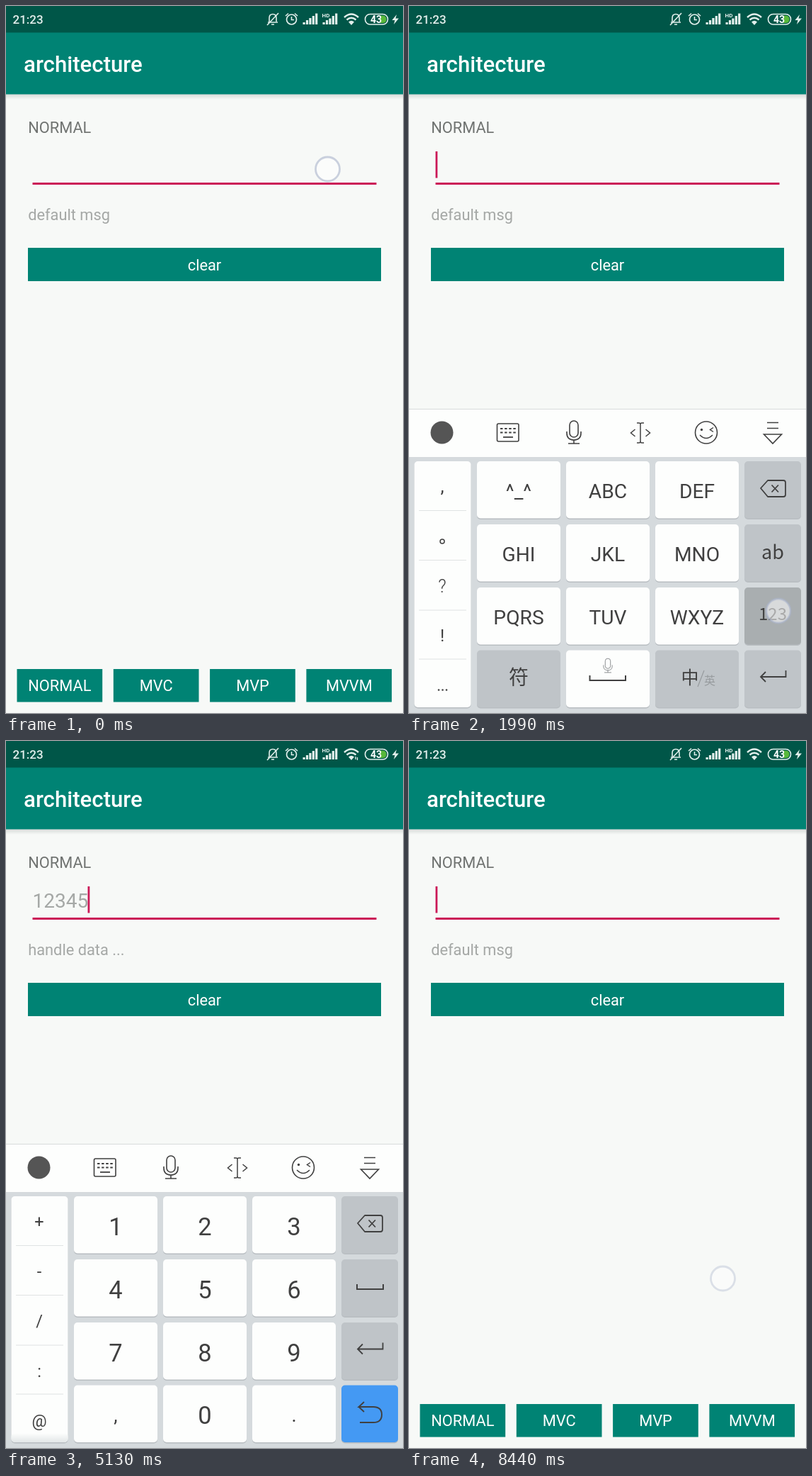
Animation of 561 by 997 pixels, one loop 8480 ms. Source, as an HTML page:

```html
<!DOCTYPE html>
<html lang="en">
<head>
<meta charset="utf-8">
<title>Input demo</title>
<style>
html, body { margin: 0; width: 100%; height: 100%; overflow: hidden; background: #f7f9f7; }
svg { display: block; width: 561px; height: 997px; }
text { font-family: Roboto, sans-serif; white-space: pre; }
.cjk { font-family: "Noto Sans CJK SC", "Noto Sans CJK", sans-serif; }
</style>
</head>
<body>
<svg id="stage" viewBox="0 0 561 997" xmlns="http://www.w3.org/2000/svg"></svg>
<script>
const LOOP = 8480;
const KEYBOARD_HEIGHT = 430;
const TEAL = '#008374', PINK = '#cb1857', INK = '#404040', GREY = '#bfc4c8';
const COLS = [96, 222, 348, 474];
const ROWS = [642, 731, 820, 908.5];

const rect = (x, y, w, h, fill, extra = '') =>
  `<rect x="${x}" y="${y}" width="${w}" height="${h}" fill="${fill}" ${extra}/>`;
const text = (x, y, size, fill, str, extra = '') =>
  `<text x="${x}" y="${y}" font-size="${size}" fill="${fill}" ${extra}>${str}</text>`;
const mid = (x, y, size, fill, str, extra = '') =>
  text(x, y, size, fill, str, 'text-anchor="middle" ' + extra);
const line = (d, color = INK, width = 1.7, extra = '') =>
  `<path d="${d}" fill="none" stroke="${color}" stroke-width="${width}" ${extra}/>`;
const circle = (x, y, r, fill, extra = '') =>
  `<circle cx="${x}" cy="${y}" r="${r}" fill="${fill}" ${extra}/>`;

function statusBar() {
  const c = '#e3efec';
  const bars = (x, heights) => heights.map((h, i) => rect(x + i * 4.4, 26 - h, 3.2, h, c)).join('');
  return rect(0, 0, 561, 37.5, '#005648') +
    text(9.5, 25, 17, c, '21:23', 'font-weight="500"') +
    // muted bell
    line('M370 23H384M372 22V17Q372 11.500 377 11.500Q382 11.500 382 17V22M375 26H379', c, 1.6) +
    line('M369 27L385 10', c, 1.6) +
    // alarm clock
    circle(403.5, 19, 7, 'none', `stroke="${c}" stroke-width="1.7"`) +
    line('M403.500 15V19.500H407M395 14L399 10.500M412 14L408 10.500', c, 1.6) +
    bars(419.5, [3, 6, 9, 12, 15.5]) +
    bars(447.5, [3, 6, 9, 12, 15.5]) +
    rect(446, 9, 14, 8.5, '#005648') +
    text(446.5, 16, 8, c, 'HD', 'font-weight="700"') +
    line('M478 16Q488 7 498 16M481.500 19.500Q488 14 494.500 19.500', c, 2.4) +
    `<path d="M484 22.500Q488 19 492 22.500L488 27Z" fill="${c}"/>` +
    `<g id="traffic">${line('M494 22V26M496.500 23V27', c, 1.3)}</g>` +
    rect(507.5, 11.5, 32, 14.5, 'none', `rx="7" stroke="${c}" stroke-width="1.6"`) +
    `<path d="M529 13.500H532Q537.500 13.500 537.500 18.700T532 24H529Z" fill="#58b83a"/>` +
    mid(523, 24, 14, '#fff', '43', 'font-weight="700"') +
    `<path d="M552 12L545.500 20H549.500L548 26L555 17.500H550.500Z" fill="${c}"/>`;
}

function appScreen() {
  const tabs = ['NORMAL', 'MVC', 'MVP', 'MVVM'];
  return rect(0, 0, 561, 997, '#f7f9f7') +
    rect(0, 124, 561, 8, 'url(#drop)') +
    rect(0, 37, 561, 87.5, TEAL) +
    statusBar() +
    text(25, 93, 31.2, '#fff', 'architecture', 'font-weight="500"') +
    text(31.2, 179, 21.8, '#707371', 'NORMAL') +
    text(37.5, 235, 28, '#a5a8a6', '', 'id="entry"') +
    rect(37.5, 249, 486, 3, PINK) +
    rect(37.5, 205, 2.8, 37.5, PINK, 'id="caret"') +
    text(31.2, 302, 21.8, '#a5a8a6', '', 'id="msg"') +
    rect(31, 341, 499, 47, TEAL) +
    mid(280.5, 373, 21.8, '#fff', 'clear') +
    tabs.map((name, i) => {
      const x = 15.5 + i * 136.3;
      return rect(x, 935, 120.7, 46.5, TEAL) + mid(x + 60.4, 966, 21.8, '#fff', name);
    }).join('');
}

// Small key glyphs, placed by their centre
const mic = (x, y, s, color) =>
  `<g transform="translate(${x} ${y}) scale(${s})">` +
  rect(-6, -16, 12, 23, 'none', `rx="6" stroke="${color}" stroke-width="1.6"`) +
  line('M-10 -1V1Q-10 11 0 11T10 1V-1M0 11V16M-8 16H8', color, 1.6) + '</g>';
const backspace = () =>
  line('M497 680L507 669H529Q532 669 532 672V689Q532 692 529 692H507ZM512.500 675.500L522 685.500M522 675.500L512.500 685.500', INK, 1.8, 'stroke-linejoin="round"');
const enter = y => line(`M532.500 ${y - 9}V${y}H497M504 ${y - 7}L497 ${y}L504 ${y + 7}`, INK, 1.8);
const spaceMark = (x1, x2, y) => line(`M${x1} ${y - 7}V${y}H${x2}V${y - 7}`, INK, 2);

function toolbar() {
  const dashes = [596, 601.5].map(y => line(`M129 ${y}H151`, INK, 1.8, 'stroke-dasharray="3.500 2.600"')).join('');
  return rect(0, 568, 561, 68, '#fdfefd') + rect(0, 568, 561, 1, '#d8dbdb') +
    circle(46.5, 601.5, 16, '#555') +
    rect(124.5, 589, 30.5, 25, 'none', `rx="2" stroke="${INK}" stroke-width="1.6"`) + dashes +
    line('M133 608H147', INK, 1.8) +
    mic(233, 601, 1, INK) +
    line('M322 588H325Q327 588 327 590V614Q327 616 325 616H322M332 588H329Q327 588 327 590M332 616H329Q327 616 327 614M319.500 597L313.500 602L319.500 607M334.500 597L340.500 602L334.500 607', INK, 1.5) +
    circle(420, 601.5, 15.5, 'none', `stroke="${INK}" stroke-width="1.6"`) +
    circle(413.5, 597.5, 1.7, INK) +
    line('M430 594.500L425.500 597.500L430 600.500M411 605Q420 614 429 605', INK, 1.5) +
    line('M506 587.500H522M506 595.500H522M501.500 604H526.500L514 617Z', INK, 1.6);
}

function keyCap(col, row, fill, id) {
  const w = col === 3 ? 80 : 118, h = 80.5;
  return rect(COLS[col], ROWS[row] + 1.5, w, h, '#b8bdc1', 'rx="5"') +
    rect(COLS[col], ROWS[row], w, h, fill, `rx="5" ${id ? `id="${id}"` : ''}`);
}

function sideColumn(items) {
  return rect(7.5, 643.5, 80, 347, '#b8bdc1', 'rx="5"') + rect(7.5, 642, 80, 347, '#fdfefd', 'rx="5"') +
    [711.5, 781.5, 852, 921].map(y => rect(14, y - 0.5, 67, 1, '#e0e3e3')).join('') + items;
}

function letterPad() {
  const names = [['^_^', 'ABC', 'DEF'], ['GHI', 'JKL', 'MNO'], ['PQRS', 'TUV', 'WXYZ']];
  const side = mid(47, 686, 26, INK, ',') +
    circle(47, 755, 3, 'none', `stroke="${INK}" stroke-width="1.5"`) +
    mid(47, 827, 25, INK, '?', 'font-weight="300"') + mid(47, 896, 24, INK, '!') +
    [42, 47.5, 53].map(x => circle(x, 964.5, 1.3, INK)).join('');
  let out = sideColumn(side);
  names.forEach((row, r) => row.forEach((name, c) => {
    out += keyCap(c, r, '#fdfefd') + mid(COLS[c] + 59, ROWS[r] + 52, 28.2, INK, name);
  }));
  out += [0, 1, 2, 3].map(r => keyCap(3, r, GREY, r === 2 ? 'modeKey' : '')).join('');
  out += keyCap(0, 3, GREY) + keyCap(1, 3, '#fdfefd') + keyCap(2, 3, GREY);
  return out + backspace() + enter(946) +
    mid(514, 780, 27, INK, 'ab', 'class="cjk"') +
    mid(514, 866, 24, INK, '123', 'class="cjk"') +
    mid(155, 957, 28, INK, '符', 'class="cjk"') +
    mic(281, 930, 0.62, '#8b8e90') + spaceMark(255.5, 306, 951) +
    mid(397, 956, 25, INK, '中', 'class="cjk"') +
    line('M408 960L417 937', '#979b9e', 1.2) +
    mid(425, 957, 16, '#979b9e', '英', 'class="cjk"');
}

function numberPad() {
  const names = [['1', '2', '3'], ['4', '5', '6'], ['7', '8', '9'], [',', '0', '.']];
  const marks = ['+', '-', '/', ':', '@'].map((s, i) => mid(47, 686 + i * 70.2, 23.5, INK, s)).join('');
  let out = sideColumn(rect(7.5, 976, 80, 13, 'url(#fade)', 'rx="5"') + marks);
  names.forEach((row, r) => row.forEach((name, c) => {
    const sign = r === 3 && c !== 1;
    out += keyCap(c, r, '#fdfefd', 'key' + name) +
      mid(COLS[c] + 59, ROWS[r] + (sign ? 51 : 54.5), sign ? 27 : 34.5, INK, name);
  }));
  out += [0, 1, 2, 3].map(r => keyCap(3, r, r === 3 ? '#4499f3' : GREY)).join('');
  return out + backspace() + spaceMark(496, 533, 773) + enter(857.5) +
    line('M506 932L498.500 939H519Q531 939 531 950T519 961H500', INK, 1.9) +
    line('M498.500 939L506 946', INK, 1.9);
}

const stage = document.getElementById('stage');
stage.innerHTML =
  `<defs>
    <linearGradient id="drop" x1="0" y1="0" x2="0" y2="1"><stop stop-color="#d5d9d7"/><stop offset="1" stop-color="#f7f9f7"/></linearGradient>
    <linearGradient id="fade" x1="0" y1="0" x2="0" y2="1"><stop stop-color="#fdfefd"/><stop offset="1" stop-color="#e2e6e7"/></linearGradient>
  </defs>` + appScreen() +
  `<g id="keyboard">${rect(0, 635, 561, 362, '#d5dadd')}${toolbar()}
    <g id="letters">${letterPad()}</g><g id="numbers">${numberPad()}</g></g>
  <g id="rings"></g>`;
const $ = id => document.getElementById(id);

// Finger taps: place, press, release, end of fade, key
const taps = [
  { x: 454.5, y: 230, down: -100, up: 580, end: 730 },
  { x: 522, y: 853, down: 1960, up: 2080, end: 2220, key: 'modeKey' },
  { x: 166, y: 698, down: 2250, up: 2330, end: 2450, key: 'key1' },
  { x: 292, y: 697, down: 2450, up: 2530, end: 2650, key: 'key2' },
  { x: 417.5, y: 698, down: 2660, up: 2750, end: 2900, key: 'key3' },
  { x: 168, y: 790, down: 2880, up: 2960, end: 3060, key: 'key4' },
  { x: 290, y: 799, down: 3060, up: 3140, end: 3240, key: 'key5' },
  { x: 430, y: 377, down: 6870, up: 7030, end: 7160 },
  { x: 443.5, y: 758, down: 8280, up: 8390, end: 8530 }
];
const SWITCH = 2100, HANDLED = 6130, CLEAR = 7030;
const typed = [2330, 2530, 2750, 2960, 3140];
const blinkStarts = [990, ...typed, CLEAR];

taps.forEach(tap => {
  $('rings').insertAdjacentHTML('beforeend',
    circle(tap.x, tap.y, 17, '#fff', 'fill-opacity=".55" stroke="#aab4cc" stroke-opacity=".6" stroke-width="2.8"'));
  tap.ring = $('rings').lastElementChild;
});

const clamp = v => Math.max(0, Math.min(1, v));

function keyboardOffset(t) {
  if (t < 3000) return KEYBOARD_HEIGHT * (1 - clamp((t - 620) / 287)) ** 3;
  return KEYBOARD_HEIGHT * clamp((t - 6170) / 330) ** 2;
}

function caretOn(t) {
  if (t < 600) return false;
  const start = blinkStarts.filter(s => s <= t).pop();
  return start === undefined || (t - start) % 995 < 500;
}

function message(t) {
  if (t < typed[0] || t >= CLEAR) return 'default msg';
  return t < HANDLED ? 'handle data ...' : 'handled data: 12345';
}

function show(id, on) { $(id).setAttribute('visibility', on ? 'inherit' : 'hidden'); }

function draw(t) {
  const count = t >= CLEAR ? 0 : typed.filter(s => s <= t).length;
  $('entry').textContent = '12345'.slice(0, count);
  $('msg').textContent = message(t);
  $('caret').setAttribute('x', 37.5 + count * 15.6);
  show('caret', caretOn(t));
  show('traffic', t >= 5130 && t < 6900);

  const offset = keyboardOffset(t);
  $('keyboard').setAttribute('transform', `translate(0 ${offset.toFixed(2)})`);
  show('keyboard', offset < KEYBOARD_HEIGHT);
  show('letters', t < SWITCH);
  show('numbers', t >= SWITCH);

  for (const tap of taps) {
    const alpha = t < tap.down ? 0 : clamp((tap.end - t) / (tap.end - tap.up));
    tap.ring.setAttribute('opacity', alpha.toFixed(3));
    if (!tap.key) continue;
    const mode = tap.key === 'modeKey';
    const pressed = t >= tap.down + (mode ? 30 : 0) && t < tap.up;
    $(tap.key).setAttribute('fill', pressed ? (mode ? '#a9aeb0' : '#d3d7d9') : (mode ? GREY : '#fdfefd'));
    if (mode && t < 1990) tap.ring.setAttribute('opacity', 0);
  }
}

const began = performance.now();
function frame() {
  draw((performance.now() - began) % LOOP);
  requestAnimationFrame(frame);
}
draw(0);
requestAnimationFrame(frame);
</script>
</body>
</html>
```
